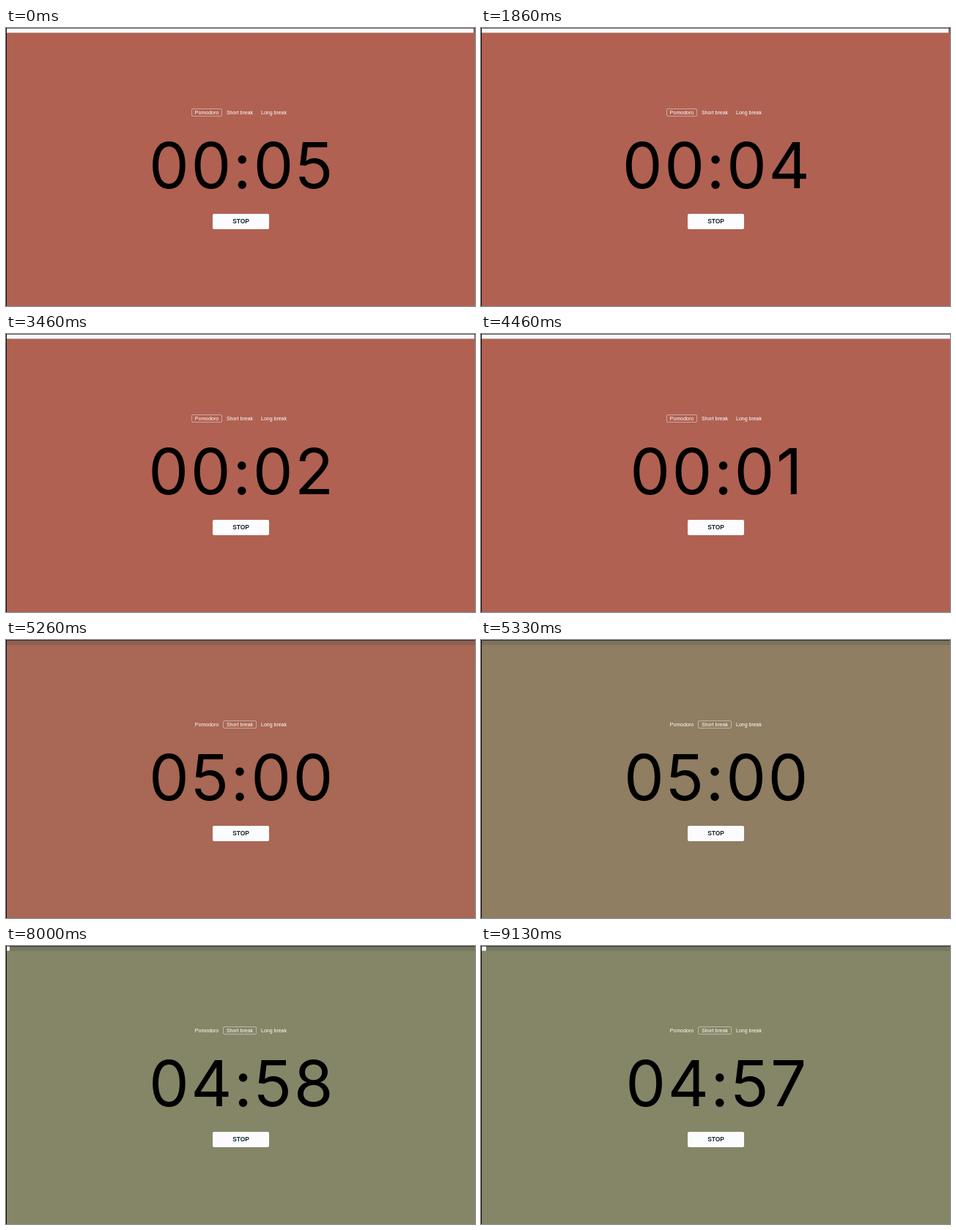
An HTML page that plays this animation: 640x380 px, repeating every 9200 ms.

```html
<!DOCTYPE html>
<html lang="en">
<head>
<meta charset="utf-8">
<title>Focus timer</title>
<style>
  html, body { margin: 0; width: 100%; height: 100%; overflow: hidden; }
  body { position: relative; background: #b06152; animation: theme 9200ms infinite; }
  @keyframes theme {
    0%, 56.87% { background: #b06152; animation-timing-function: ease; }
    59.15%, 100% { background: #858667; }
  }
  body > * { position: absolute; box-sizing: border-box; }
  #track { left: 1px; top: 0; right: 0; height: 7px; background: rgba(72, 76, 82, .25); }
  #bar { height: 100%; background: linear-gradient(#fafaff 6px, #fafaff80 6px); }
  #top-edge { left: 0; top: 0; width: 100%; height: 1px; background: rgba(0, 0, 0, .55); }
  #left-edge { left: 0; top: 0; width: 1px; height: 100%; background: #100a09; }
  .tab {
    top: 110px; height: 11px; border: 1px solid transparent; border-radius: 2px;
    font: 7px/9px "Liberation Sans", Arial, sans-serif; color: #fff; text-align: center; white-space: nowrap;
  }
  .tab.on { border-color: rgba(255, 255, 255, .42); }
  #clock {
    left: 2px; top: 138px; width: 640px; height: 100px; text-align: center; color: #000;
    font: 87px/100px Inter, sans-serif; font-optical-sizing: none; letter-spacing: 2.5px;
  }
  #stop {
    left: 282px; top: 254px; width: 77px; height: 21px; border-radius: 2px; background: #fcfcff;
    font: bold 8.4px/21px "Liberation Sans", Arial, sans-serif;
    color: #10262c; text-align: center;
  }
</style>
</head>
<body>
  <div id="track"><div id="bar"></div></div>
  <div id="top-edge"></div>
  <div id="left-edge"></div>
  <div class="tab" style="left:253px;width:42px">Pomodoro</div>
  <div class="tab" style="left:296px;width:46px">Short break</div>
  <div class="tab" style="left:343px;width:45px">Long break</div>
  <div id="clock"></div>
  <div id="stop">STOP</div>
<script>
  const LOOP = 9200, FIRST_TICK = 1060, LAST_TICK = 8060, BREAK_AT = 5200;
  const WORK = 1500, REST = 300, START = 5;
  const tabs = document.querySelectorAll('.tab');
  const clock = document.getElementById('clock');
  const bar = document.getElementById('bar');
  const pad = n => String(n).padStart(2, '0');
  const theme = document.body.getAnimations()[0];

  function draw() {
    const t = performance.now() % LOOP;
    theme.currentTime = t;
    // The clock holds its last value until the loop restarts.
    const ticks = Math.floor((Math.min(t, LAST_TICK) - FIRST_TICK) / 1000) + 1;
    const resting = t >= BREAK_AT;
    const total = resting ? REST : WORK;
    const left = START - Math.max(0, ticks) + (resting ? REST : 0);
    const label = pad(Math.floor(left / 60)) + ':' + pad(left % 60);
    if (clock.textContent !== label) clock.textContent = label;
    bar.style.width = 100 * (1 - left / total) + '%';
    tabs[0].classList.toggle('on', !resting);
    tabs[1].classList.toggle('on', resting);
    requestAnimationFrame(draw);
  }
  draw();
</script>
</body>
</html>
```
